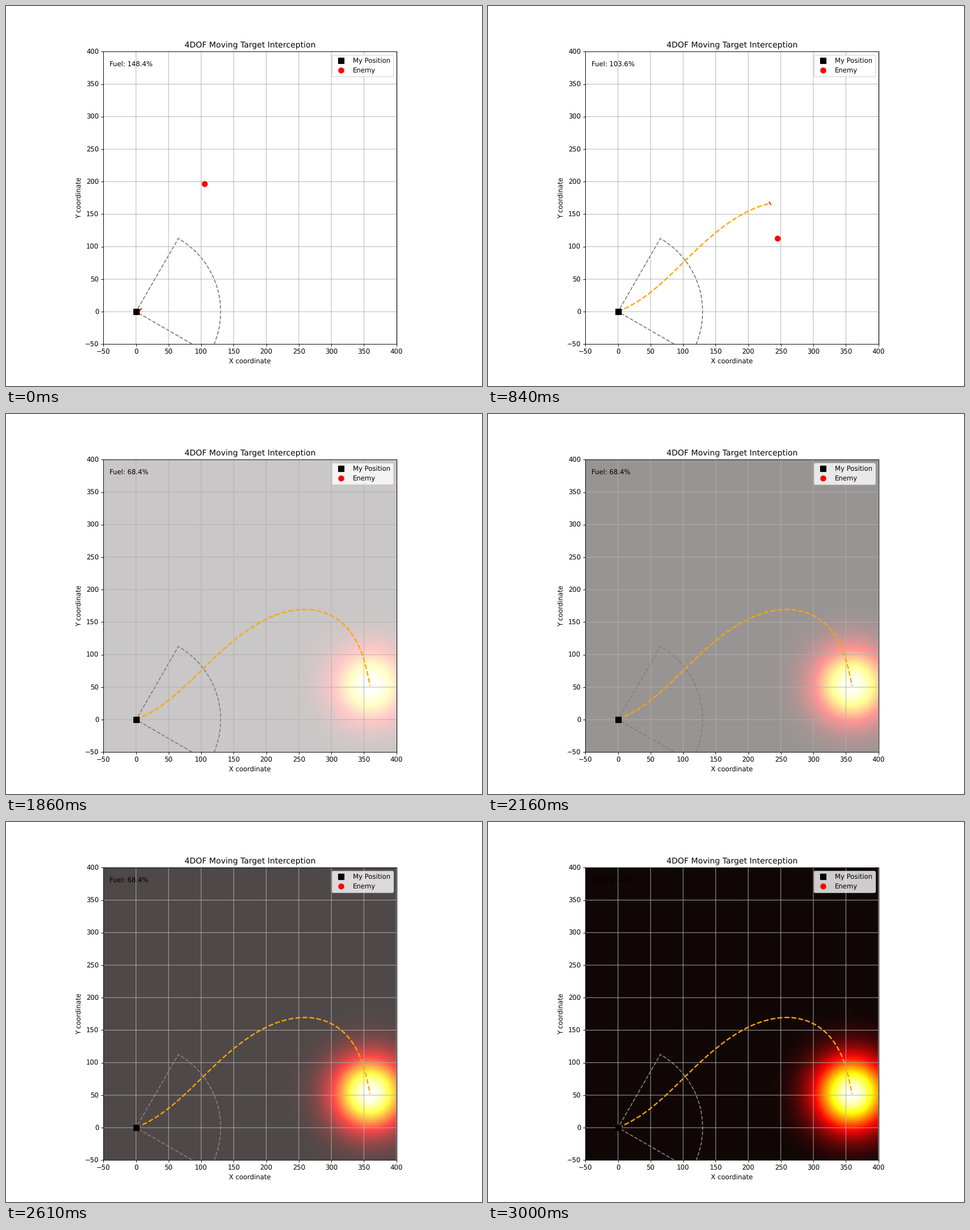
Recreate the animation shown at these times as a matplotlib script. Size 837x669 px, loop 3.03 s.

```python
import numpy as np
import matplotlib.pyplot as plt
from matplotlib.animation import FuncAnimation
from matplotlib.patches import Wedge

DPI = 83.7
FLIGHT, BLAST = 51, 50
LO, HI = -50, 400
LEAD = 22       # how far the nozzle turns ahead of the velocity
SPREAD = 40     # fireball radius

plt.rcParams["text.hinting"] = "no_hinting"


def smooth_path(t, keys):
    """Polynomial through (time, x, y) key points."""
    kt, kx, ky = np.array(keys).T
    u = kt / kt[-1]
    return [np.polyval(np.polyfit(u, k, len(u) - 1), t / kt[-1]) for k in (kx, ky)]


steps = np.arange(FLIGHT + 1)
px, py = smooth_path(steps, [
    (0, 0, 0), (7, 50.3, 30), (17, 127, 101.4), (29, 233.5, 166.6),
    (37, 301, 159.5), (43, 336.5, 124.5), (51, 359.5, 52)])
vx, vy = np.gradient(px), np.gradient(py)
nozzle_x = vx + LEAD * np.gradient(vx)
nozzle_y = vy + LEAD * np.gradient(vy)
thrust = np.arctan2(nozzle_y, nozzle_x)

fig, ax = plt.subplots(figsize=(837 / DPI, 669 / DPI), dpi=DPI)
ax.set_title("4DOF Moving Target Interception")
ax.set_xlabel("X coordinate")
ax.set_ylabel("Y coordinate")

# Fireball
axis = np.linspace(LO, HI, 300)
gx, gy = np.meshgrid(axis, axis)
heat = np.exp(-((gx - px[-1])**2 + (gy - py[-1])**2) / (2 * SPREAD**2))
blast = ax.imshow(heat, extent=(LO, HI, LO, HI), origin="lower", cmap="hot",
                  vmin=0, vmax=1, alpha=0)

# Detection sector
ax.add_patch(Wedge((0, 0), 130, -30, 60, fill=False, ec="gray", ls="--", lw=1.5))

trail, = ax.plot([], [], "--", color="orange", lw=2)
nozzle, = ax.plot([], [], color="orangered", lw=2, solid_capstyle="butt")
ax.plot(0, 0, "ks", ms=8, label="My Position")
enemy, = ax.plot([], [], "ro", ms=8, label="Enemy")
fuel = ax.text(0.02, 0.95, "", transform=ax.transAxes)

ticks = range(LO, HI + 1, 50)
ax.set(xlim=(LO, HI), ylim=(LO, HI), xticks=ticks, yticks=ticks, aspect="equal")
ax.grid(True)
for line in ax.get_xgridlines() + ax.get_ygridlines():
    line.set_snap(False)
ax.legend(loc="upper right")


def update(i):
    flying = i < FLIGHT
    n = min(i + 1, FLIGHT)
    trail.set_data(px[:n + 1], py[:n + 1])
    dx, dy = 3 * np.cos(thrust[n]), 3 * np.sin(thrust[n])
    nozzle.set_data([px[n] - dx, px[n] + dx], [py[n] - dy, py[n] + dy])
    enemy.set_data([100 + 5 * n], [200 - 3 * n])
    fuel.set_text(f"Fuel: {150 - 1.6 * n:.1f}%")
    nozzle.set_visible(flying)
    enemy.set_visible(flying)
    blast.set_visible(not flying)
    blast.set_alpha(max(0, i - FLIGHT) / BLAST)
    return blast, trail, nozzle, enemy, fuel


anim = FuncAnimation(fig, update, frames=FLIGHT + BLAST, interval=30,
                     repeat=True, repeat_delay=0, blit=False)
plt.show()
```
